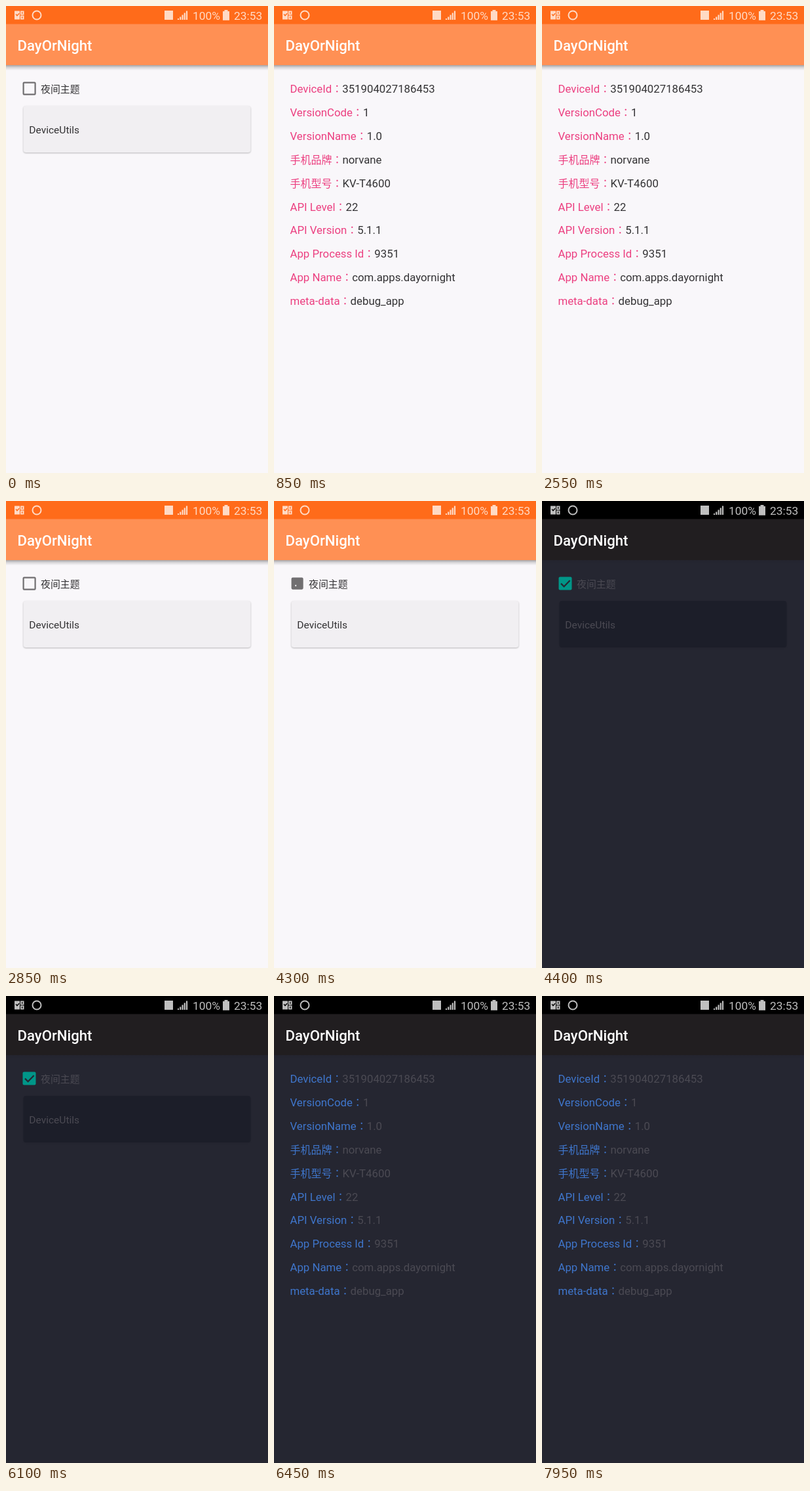
Write an HTML page that moves like this. It is 400 by 711 pixels and loops after 8 s.

```html
<!DOCTYPE html>
<html lang="zh-CN">
<head>
<meta charset="utf-8">
<title>DayOrNight</title>
<style>
  html, body { margin: 0; width: 100%; height: 100%; overflow: hidden; background: #000; }
  svg {
    display: block; width: 100%; height: 100%;
    font-family: Roboto, "Noto Sans CJK SC", sans-serif;
    --status: #ff6b1a; --bar: #ff9054; --page: #f9f7fa; --card: #f1eff2;
    --text: #333234; --accent: #ec3f80; --shade: .34; --card-shade: .26;
  }
  svg.night {
    --status: #000; --bar: #211e20; --page: #252631; --card: #1c1e29;
    --text: #4b4a53; --accent: #3f76cc; --shade: .05; --card-shade: .05;
  }
  svg.blank { --status: #000; }
  svg.blank .page { display: none; }
  .paper { fill: var(--page); }
  .bar { fill: var(--bar); }
  .shadow { fill: url(#fall); opacity: var(--shade); }
  .title { fill: #fff; font-size: 22.2px; font-weight: 500; }
  .card { fill: var(--card); }
  .card-shadow { fill: #000; opacity: var(--card-shade); filter: url(#soft); }
  .body { fill: var(--text); font-size: 15.55px; }
  .option { font-size: 14.9px; }
  .row { fill: var(--text); font-size: 16.8px; }
  .label { fill: var(--accent); }
  .han, .colon { font-size: 16px; }
  .colon { font-family: "Noto Sans CJK TC", "Noto Sans CJK HK", sans-serif; }
  .status { fill: #fff; font-size: 17.4px; }
  .checked, .night .box { display: none; }
  .night .checked { display: inline; }
</style>
</head>
<body>
<svg id="stage" viewBox="0 0 400 711" preserveAspectRatio="none">
  <defs>
    <linearGradient id="fall" x2="0" y2="1">
      <stop offset="0"/>
      <stop offset=".45" stop-opacity=".4"/>
      <stop offset="1" stop-opacity="0"/>
    </linearGradient>
    <filter id="soft" x="-5%" y="-10%" width="110%" height="130%">
      <feGaussianBlur stdDeviation="1"/>
    </filter>
    <g id="frame">
      <rect class="paper" width="400" height="711"/>
      <rect class="shadow" y="90" width="400" height="8"/>
      <rect class="bar" y="27" width="400" height="63"/>
      <text class="title" x="17.5" y="68">DayOrNight</text>
    </g>
  </defs>

  <g id="home" class="page">
    <use href="#frame"/>
    <g class="box" id="box">
      <rect x="26.6" y="116.6" width="18" height="18" rx="1.2" fill="none" stroke="#716f71" stroke-width="2.2"/>
      <path id="fill" fill="#716f71" fill-rule="evenodd"/>
    </g>
    <g class="checked">
      <rect x="25.5" y="115.5" width="20" height="20" rx="2" fill="#009688"/>
      <path d="M29 125.6l4.6 4.6 9-9.2" fill="none" stroke="#252631" stroke-width="2.2"/>
    </g>
    <text class="body option" x="53" y="132">夜间主题</text>
    <rect class="card-shadow" x="26.5" y="153" width="347" height="71" rx="4"/>
    <rect class="card" x="26.5" y="152" width="347" height="71" rx="4"/>
    <text class="body" x="35.3" y="194">DeviceUtils</text>
  </g>

  <g id="detail" class="page"><use href="#frame"/></g>

  <rect width="400" height="27.5" fill="var(--status)"/>
  <g class="status" opacity=".75">
    <path fill-rule="evenodd" d="M13 7.5h8v13h-8zM14.5 13l1-1 1.5 1.6 2.6-2.8 1 1-3.6 3.9zM22 7.5h5.5v6H22zm2 1.5v3h1.3V9zM22 14.5h5.5v6H22zm2 1.5v3h1.3v-3z"/>
    <circle cx="47" cy="14" r="6.5" fill="none" stroke="#fff" stroke-width="2"/>
    <rect x="242" y="7" width="13" height="14"/>
    <path d="M262 21v-2h2v2zM265.2 21v-4.5h2.2V21zM268.5 21v-7.5h2.2V21zM271.7 21V10.5h2.2V21zM274.9 21V7.5h2.2V21z"/>
    <text x="285" y="20.8">100%</text>
    <path d="M331 8h2.5V6h5v2h2.5v13.7h-10z"/>
    <text x="348" y="20.8">23:53</text>
  </g>
</svg>
<script>
  const LOOP = 8000, TICK = 50, WIDTH = 400, PARALLAX = 0.3;
  const byId = id => document.getElementById(id);
  const [stage, home, detail, box, fill] = ['stage', 'home', 'detail', 'box', 'fill'].map(byId);

  const rows = [
    ['DeviceId', '351904027186453'], ['VersionCode', '1'], ['VersionName', '1.0'],
    ['手机品牌', 'norvane'], ['手机型号', 'KV-T4600'], ['API Level', '22'],
    ['API Version', '5.1.1'], ['App Process Id', '9351'],
    ['App Name', 'com.apps.dayornight'], ['meta-data', 'debug_app']
  ];
  // Traditional Chinese centres the full-width colon.
  const colon = '<tspan class="colon" lang="zh-TW">：</tspan>';
  const markHan = text => text.replace(/[一-龥]+/g, '<tspan class="han">$&</tspan>');
  detail.insertAdjacentHTML('beforeend', rows.map(([label, value], i) =>
    `<text class="row" x="24.5" y="${132.4 + i * 35.83}">` +
    `<tspan class="label">${markHan(label)}${colon}</tspan>${value}</text>`).join(''));

  function ease(t, start, end) {
    const p = Math.min(1, Math.max(0, (t - start) / (end - start)));
    const q = 1 - (1 - p) ** 1.5;
    return q * q * (3 - 2 * q);
  }

  // How far the detail page covers the home page, 0 to 1.
  const coverage = t => ease(t, 500, 850) - ease(t, 2550, 2850) + ease(t, 6150, 6450);

  function drawCheckbox(t) {
    const step = t < 4200 ? 0 : Math.min(3, Math.floor((t - 4200) / TICK) + 1);
    const scale = 1 - step * 0.035;
    box.setAttribute('transform', `translate(35.5 125.5) scale(${scale}) translate(-35.5 -125.5)`);
    const hole = 16 - step * 4.6;
    const x = 35.5 - hole / 2 - (step === 3 ? 2.6 : 0);
    const y = 125.5 - hole / 2 + (step === 3 ? 3.6 : 0);
    fill.setAttribute('d', step
      ? `M27 117h17v17h-17zM${x} ${y}h${hole}v${hole}h${-hole}z` : '');
  }

  function draw(now) {
    const t = Math.floor(Math.max(0, now - begin) % LOOP / TICK) * TICK;
    const cover = coverage(t);
    stage.classList.toggle('blank', t >= 4350 && t < 4400);
    stage.classList.toggle('night', t >= 4400);
    home.setAttribute('transform', `translate(${-cover * PARALLAX * WIDTH} 0)`);
    detail.setAttribute('transform', `translate(${(1 - cover) * WIDTH} 0)`);
    drawCheckbox(t);
    requestAnimationFrame(draw);
  }

  const begin = performance.now();
  draw(begin);
</script>
</body>
</html>
```
